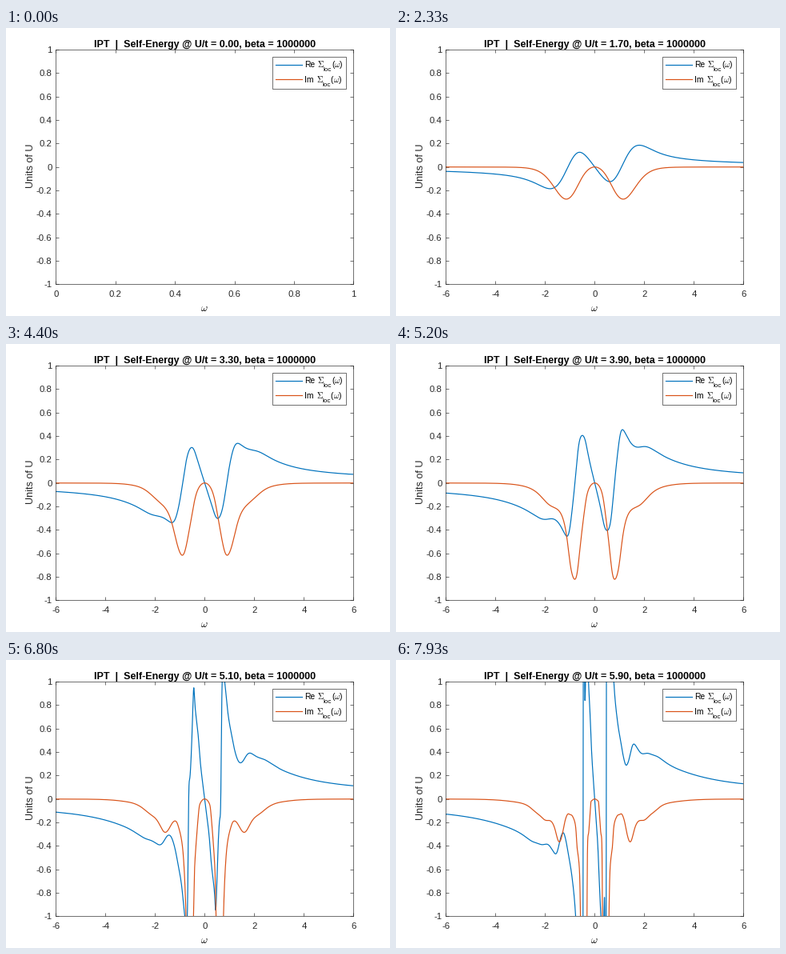
Animation, 480 px wide and 360 px high, one loop 8000 ms. Source, as a matplotlib script:

```python
import numpy as np
import matplotlib.pyplot as plt
from matplotlib.animation import FuncAnimation
from matplotlib.patches import Rectangle

W, H, DPI = 480, 360, 100
FRAMES, LOOP_MS = 120, 8000
INK = (0.15, 0.15, 0.15)
BLUE, ORANGE = (0, 0.447, 0.741), (0.85, 0.325, 0.098)

plt.rcParams.update({
    "font.family": "Liberation Sans",
    "mathtext.fontset": "cm",
    "axes.unicode_minus": False,
})


def px(n):
    """Pixels to points."""
    return n * 72 / DPI


THIN, THICK = px(0.65), px(1.2)

# ---- Iterated perturbation theory, Bethe lattice, half filling, T = 0 ----
N, WMAX, ETA = 4096, 6.0, 0.01
w = np.linspace(0, WMAX, N + 1)
dw = w[1]
z0 = w + 1j * ETA
lag = np.fft.fftfreq(4 * N, 1 / (4 * N))
kernel = np.zeros(4 * N)
odd = lag % 2 == 1
kernel[odd] = -2 / (np.pi * lag[odd])
kernel_ft = np.fft.rfft(kernel)


def bethe(z):
    return 2 * (z - np.sqrt(z - 1) * np.sqrt(z + 1))


def self_energy(g, u):
    a = -np.imag(1 / (z0 - g / 4)) / np.pi
    a[0] *= 0.5
    triple = np.fft.irfft(np.fft.rfft(a, 4 * N) ** 3, 4 * N)[:N + 1]
    im = np.minimum(-np.pi * u**2 * dw**2 * triple, 0)
    both = np.concatenate([im[:0:-1], im])
    re = np.fft.irfft(np.fft.rfft(both, 4 * N) * kernel_ft, 4 * N)
    return re[N:2 * N + 1] + 1j * im


def solve(g, u):
    for _ in range(80):
        s = self_energy(g, u)
        new = bethe(z0 - s)
        change = np.abs(new - g).max()
        g = new
        if change < 1e-4:
            break
    return g, s / u


curves = [None]
g = bethe(z0)
for k in range(1, FRAMES // 2):
    g, s = solve(g, 0.05 * k)      # half bandwidth D = 2t is the unit
    curves.append(s)
w_full = np.concatenate([-w[:0:-1], w])


# ---- Figure ----
fig = plt.figure(figsize=(W / DPI, H / DPI), dpi=DPI, facecolor="white")
ax = fig.add_axes([0.13, 0.11, 0.775, 0.815])
ax.set_ylim(-1, 1)
ax.tick_params(direction="in", top=True, right=True, length=px(3.7),
               width=THIN, color=INK, labelcolor=INK,
               labelsize=px(11.43), pad=px(5))
ax.tick_params(axis="x", pad=px(7.6))
for side in ax.spines.values():
    side.set(linewidth=THIN, edgecolor=INK)

re_line, = ax.plot([], [], color=BLUE, lw=THICK)
im_line, = ax.plot([], [], color=ORANGE, lw=THICK)


def label(x, y, s, size, **kw):
    """Text with its baseline at y pixels from the top."""
    kw = {"color": "black", "va": "baseline", **kw}
    return fig.text(x / W, 1 - y / H, s, fontsize=px(size), zorder=12, **kw)


def legend_row(y, name, color, x):
    fig.add_artist(plt.Line2D([337 / W, 370 / W], [1 - y / H] * 2,
                              color=color, lw=THICK, zorder=12))
    base = y + 3.5
    label(373.3, base, name, 10.3)
    label(x, base, r"$\Sigma$", 10.3)
    label(x + 7.6, base + 4.8, "loc", 8.2)
    label(x + 17.8, base, "(", 10.3)
    label(x + 21, base, r"$\omega$", 10.3)
    label(x + 28, base, ")", 10.3)


fig.add_artist(Rectangle((332.5 / W, 1 - 75.7 / H), 92 / W, 40 / H,
                         transform=fig.transFigure, facecolor="white",
                         edgecolor=INK, lw=THIN, zorder=11))
legend_row(45.5, "Re", BLUE, 389.2)
legend_row(64.3, "Im", ORANGE, 387.8)

title = label(248.2, 24, "", 12.5, ha="center", weight="bold")
label(30.5, 172.7, "Units of U", 12.5, ha="center", va="center", rotation=90,
      color=INK)
label(247.9, 353.6, r"$\omega$", 12.57, ha="center")


def set_ticks(axis, lo, hi, step):
    ticks = np.round(np.arange(lo, hi + step / 2, step), 1) + 0.0
    axis.set_ticks(ticks, [f"{t:g}" for t in ticks])


set_ticks(ax.yaxis, -1, 1, 0.2)


def draw(i):
    k = i // 2
    title.set_text(f"IPT  |  Self-Energy @ U/t = {k / 10:.2f}, beta = 1000000")
    s = curves[k]
    if s is None:
        ax.set_xlim(0, 1)
        set_ticks(ax.xaxis, 0, 1, 0.2)
        re_line.set_data([], [])
        im_line.set_data([], [])
    else:
        ax.set_xlim(-6, 6)
        set_ticks(ax.xaxis, -6, 6, 2)
        re_line.set_data(w_full, np.concatenate([-s.real[:0:-1], s.real]))
        im_line.set_data(w_full, np.concatenate([s.imag[:0:-1], s.imag]))
    return title, re_line, im_line


anim = FuncAnimation(fig, draw, frames=FRAMES, interval=LOOP_MS / FRAMES,
                     init_func=lambda: draw(0), repeat=True, repeat_delay=0,
                     blit=False)
plt.show()
```
